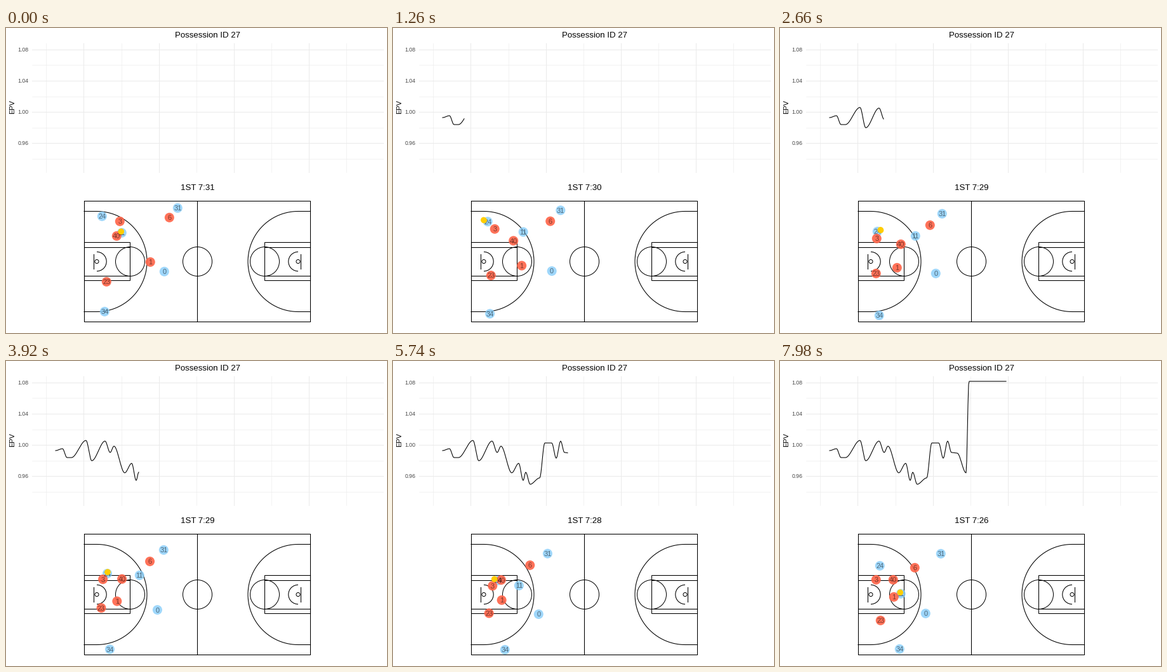
These frames come from a looping animation (600x480 px, 8000 ms). A matplotlib script:

```python
import math

import matplotlib.pyplot as plt
import numpy as np
from matplotlib.animation import FuncAnimation
from matplotlib.patches import Arc, Circle

W, H, DPI = 600, 480, 100
LOOP, TICK, STEP = 8000, 40, 140
PX = 72 / DPI
THIN, NORMAL = 0.6, 1.07

plt.rcParams["font.family"] = "Liberation Sans"
fig = plt.figure(figsize=(W / DPI, H / DPI), dpi=DPI, facecolor="white")
ax = fig.add_axes([0, 0, 1, 1])
ax.set_xlim(0, W)
ax.set_ylim(H, 0)
ax.axis("off")


def label(x, y, text, size, ha="center", **kw):
    """Text whose digits are vertically centred on y; size in pixels."""
    return ax.text(x, y + 0.36 * size, text, fontsize=size * PX, ha=ha,
                   va="baseline", **kw)


def line(xs, ys, color="black", width=NORMAL, **kw):
    return ax.plot(xs, ys, color=color, lw=width * PX, **kw)[0]


def smoothstep(u):
    return u * u * (3 - 2 * u)


# ---- chart -------------------------------------------------------------
LEFT, RIGHT, TOP, BOTTOM = 41, 594, 23.5, 226.5
GRID = "#ebebeb"
for i in range(9):
    x = 63.2 + 59.15 * i
    line([x, x], [TOP, BOTTOM], GRID, NORMAL if i % 2 else THIN, zorder=0)
for i in range(8):
    y = 33.9 + 24.55 * i
    line([LEFT, RIGHT], [y, y], GRID, THIN if i % 2 else NORMAL, zorder=0)
    if i % 2 == 0:
        label(35.5, y, f"{1.08 - 0.02 * i:.2f}", 8.8, "right",
              color="#4d4d4d")

label(317.5, 10, "Possession ID 27", 13.2)
ax.text(10.5, 124.3, "EPV", fontsize=11 * PX, rotation=90, ha="center",
        va="center")
clock = label(301.5, 250.2, "", 13.2)

# Turning points of the value curve, eased from one to the next.
TURNS = np.array([
    (78, 141), (89, 138), (96, 152), (103, 152), (126, 125), (135, 157),
    (156, 126), (164, 144), (170, 134), (187, 176), (198, 161), (205, 188),
    (209, 175), (216, 194), (231, 184), (239, 129), (250, 129), (257, 153),
    (264, 126), (270, 144), (279, 145), (293, 176), (297.5, 32), (360, 32)])


def epv(x):
    tx, ty = TURNS.T
    i = np.clip(np.searchsorted(tx, x, "right") - 1, 0, len(tx) - 2)
    u = (x - tx[i]) / (tx[i + 1] - tx[i])
    return ty[i] + (ty[i + 1] - ty[i]) * smoothstep(u)


trace = line([], [], zorder=3, solid_joinstyle="round")


# ---- court -------------------------------------------------------------
MID_X, MID_Y = 301.5, 367.5
X0, X1, Y0, Y1 = 123, 479, 272, 462


def box(x0, y0, x1, y1):
    line([x0, x1, x1, x0, x0], [y0, y0, y1, y1, y0],
         solid_joinstyle="miter")


def ring(x, y, r):
    ax.add_patch(Circle((x, y), r, fill=False, lw=PX))


box(X0, Y0, X1, Y1)
line([301, 301], [Y0, Y1])
ring(MID_X, MID_Y, 23)
half_turn = np.linspace(-math.pi / 2, math.pi / 2, 60)
for side, base in ((-1, X0), (1, X1)):
    lane = MID_X - 0.5 + side * 106
    hoop = MID_X + side * 158.5
    board = hoop - 0.5 + side * 4.5
    box(base, 337, lane, 397)
    for y in (345, 390):
        line([base, lane], [y, y])
    line([board, board], [356, 379])
    ring(lane + 0.5, MID_Y, 23)
    ring(hoop, MID_Y, 3)
    turn = 90 * side
    ax.add_patch(Arc((hoop, MID_Y), 30.4, 30.4, theta1=turn,
                     theta2=turn + 180, lw=NORMAL * PX))
    # three-point line: two straight ends joined by a half circle
    xs = hoop - side * 79 * np.cos(half_turn)
    ys = MID_Y + 79 * np.sin(half_turn)
    line(np.r_[base, xs, base], np.r_[ys[0], ys, ys[-1]], snap=False)

# ---- players and ball --------------------------------------------------
# Each player runs along one cubic through four key positions.
KEYS = [0, 19, 36, 57]
BLUE = {
    24: [(151, 296), (153, 320), (164, 343), (157, 322)],
    31: [(270, 283), (255, 292), (244, 301), (253, 303)],
    11: [(182, 322), (213, 327), (203, 347), (190, 366)],
    0: [(249, 383), (245, 386), (232, 396), (229, 397)],
    34: [(155, 446), (156, 452), (171, 454), (188, 453)],
}
RED = {
    3: [(179, 304), (152, 331), (155, 351), (151, 344)],
    6: [(257, 298), (236, 310), (219, 319), (212, 325)],
    40: [(174, 327), (190, 340), (174, 344), (178, 344)],
    1: [(227, 368), (184, 377), (171, 377), (179, 371)],
    23: [(158, 399), (151, 386), (150, 393), (158, 408)],
}
NUM = 11


def dot(r, color, alpha, z):
    return ax.add_patch(Circle((0, 0), r, color=color, alpha=alpha, lw=0,
                               zorder=z))


players = {}  # number: (cubic, dot, text)
for team, color, alpha, z in ((BLUE, "lightskyblue", 0.8, 4),
                              (RED, "tomato", 0.9, 5)):
    for number, points in team.items():
        cubic = np.polyfit(KEYS, points, 3)
        tag = label(0, 0, str(number), NUM, alpha=0.52, zorder=6)
        players[number] = cubic, dot(7.5, color, alpha, z), tag
ball = [dot(4.6, "#ffcd00", 1, 7) for _ in range(2)]


def place(number, k):
    x, y = players[number][0].T
    return np.array([np.polyval(x, k), np.polyval(y, k)]) + 0.3


def ball_at(k):
    """11 passes to 24, who dribbles from side to side and passes back."""
    w = np.clip((k - 2) / 4, 0, 1) - np.clip((k - 46) / 4, 0, 1)
    sway = 7 * w * math.cos(math.tau * (k - 21) / 32)
    return (1 - w) * place(11, k) + w * place(24, k) + (sway - 1, -2)


def update(n):
    k = (n * TICK + TICK // 2) // STEP

    xs = np.arange(TURNS[0, 0], 67 + 5.08 * k)
    trace.set_data(xs, epv(xs))

    passed = math.floor((k * STEP - 900) / 1631 + 1)
    clock.set_text(f"1ST 7:{31 - passed}")

    for number, (_, disc, tag) in players.items():
        x, y = place(number, k)
        disc.center = x, y
        tag.set_position((x, y + 0.36 * NUM))
    # a fast ball shows at two neighbouring moments
    for disc, lag in zip(ball, (0, 0.45)):
        disc.center = ball_at(max(k - lag, 0))
    return []


anim = FuncAnimation(fig, update, frames=LOOP // TICK, interval=TICK,
                     repeat=True, repeat_delay=0, blit=False)
plt.show()
```
